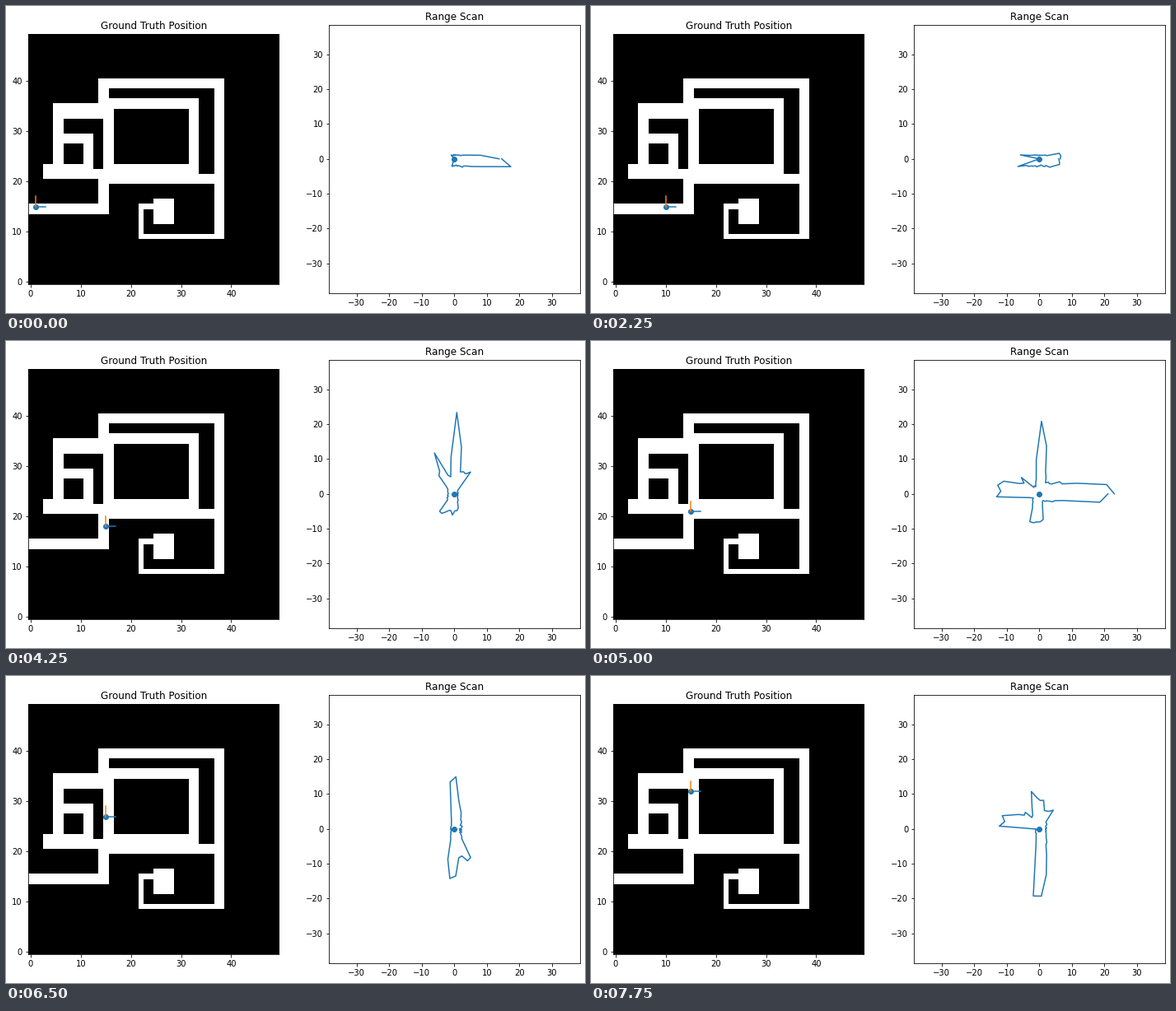
Write a matplotlib script that moves like this. It is 703 px wide and 373 px high and loops after 8000 ms.

```python
import numpy as np
import matplotlib.pyplot as plt
from matplotlib.animation import FuncAnimation

W, H, DPI = 703, 373, 72
FRAMES, INTERVAL = 32, 250
CELLS, RAYS, MAX_RANGE = 50, 50, 35
NOISE = 0.08

# Each corridor is a square brush swept along a path of (col, row) corners.
CORRIDORS = [
    (2, [(0, 14), (14, 14), (14, 21)]),
    (2, [(14, 33), (14, 39), (37, 39), (37, 9)]),
    (2, [(15, 20), (15, 35), (32, 35), (32, 20)]),
    (2, [(14, 20), (37, 20)]),
    (4, [(15, 20), (30, 20)]),
    (2, [(5, 34), (5, 28), (11, 28), (11, 21)]),
    (2, [(5, 28), (5, 21), (13, 21)]),
    (3, [(3, 21), (10, 21)]),
    (3, [(5, 33), (13, 33)]),
    (1, [(37, 9), (22, 9), (22, 15), (25, 15)]),
    (4, [(25, 12), (25, 13)]),
]


def build_grid():
    grid = np.zeros((CELLS, CELLS), bool)
    for width, path in CORRIDORS:
        for a, b in zip(path, path[1:]):
            (c0, r0), (c1, r1) = np.minimum(a, b), np.maximum(a, b) + width
            grid[r0:r1, c0:c1] = True
    return grid


grid = build_grid()
angles = np.linspace(0, 2 * np.pi, RAYS)


def pose(step):
    """Drive right along the bottom corridor, then straight up."""
    return 1 + min(step, 14), 15 + max(step - 14, 0)


def cast(x0, y0):
    """Distance along each ray; a ray that leaves the map reads zero."""
    r = np.arange(0, MAX_RANGE, 0.05)[:, None]
    x = np.round(x0 + r * np.cos(angles), 6)
    y = np.round(y0 + r * np.sin(angles), 6)
    cols, rows = ([f(v).astype(int).clip(0, CELLS - 1)
                   for f in (np.floor, np.ceil)] for v in (x, y))
    # A point is blocked only when all four cells around it are walls.
    is_open = np.any([grid[j, i] for i in cols for j in rows], axis=0)
    outside = x < 0
    stop = np.argmax(~is_open | outside, axis=0)
    return np.where(outside[stop, np.arange(RAYS)], 0, r[stop, 0])


def scan(step):
    rng = np.random.default_rng(100 + step)
    dist = cast(*pose(step)) * rng.normal(1.01, NOISE, RAYS)
    return dist * np.cos(angles), dist * np.sin(angles)


fig = plt.figure(figsize=((W + 1e-6) / DPI, (H + 1e-6) / DPI), dpi=DPI,
                 facecolor="white")


def add_axes(x, y, w, h, title, limit, ticks):
    ax = fig.add_axes([x / W, y / H, w / W, h / H])
    ax.set(title=title, xlim=limit, ylim=limit, xticks=ticks, yticks=ticks)
    return ax


LEFT, BOTTOM, SIDE, TALL = 26.95, 24.2, 304.36, 326.16
map_ax = add_axes(LEFT, BOTTOM + (TALL - SIDE) / 2, SIDE, SIDE,
                  "Ground Truth Position", (-0.5, 49.5), range(0, 50, 10))
map_ax.imshow(grid, cmap="gray", origin="lower")
dot = map_ax.scatter([0], [0], color="C0")
x_arm, = map_ax.plot([], [], "C0")
y_arm, = map_ax.plot([], [], "C1")

scan_ax = add_axes(LEFT + 1.2 * SIDE, BOTTOM, SIDE, TALL,
                   "Range Scan", (-38.5, 38.5), range(-30, 40, 10))
scan_ax.scatter([0], [0], color="C0")
outline, = scan_ax.plot([], [], "C0")


def update(step):
    x, y = pose(step)
    dot.set_offsets([[x, y]])
    x_arm.set_data([x, x + 2], [y, y])
    y_arm.set_data([x, x], [y, y + 2])
    outline.set_data(*scan(step))
    return dot, x_arm, y_arm, outline


anim = FuncAnimation(fig, update, frames=FRAMES, interval=INTERVAL,
                     repeat=True, repeat_delay=0)
plt.show()
```
